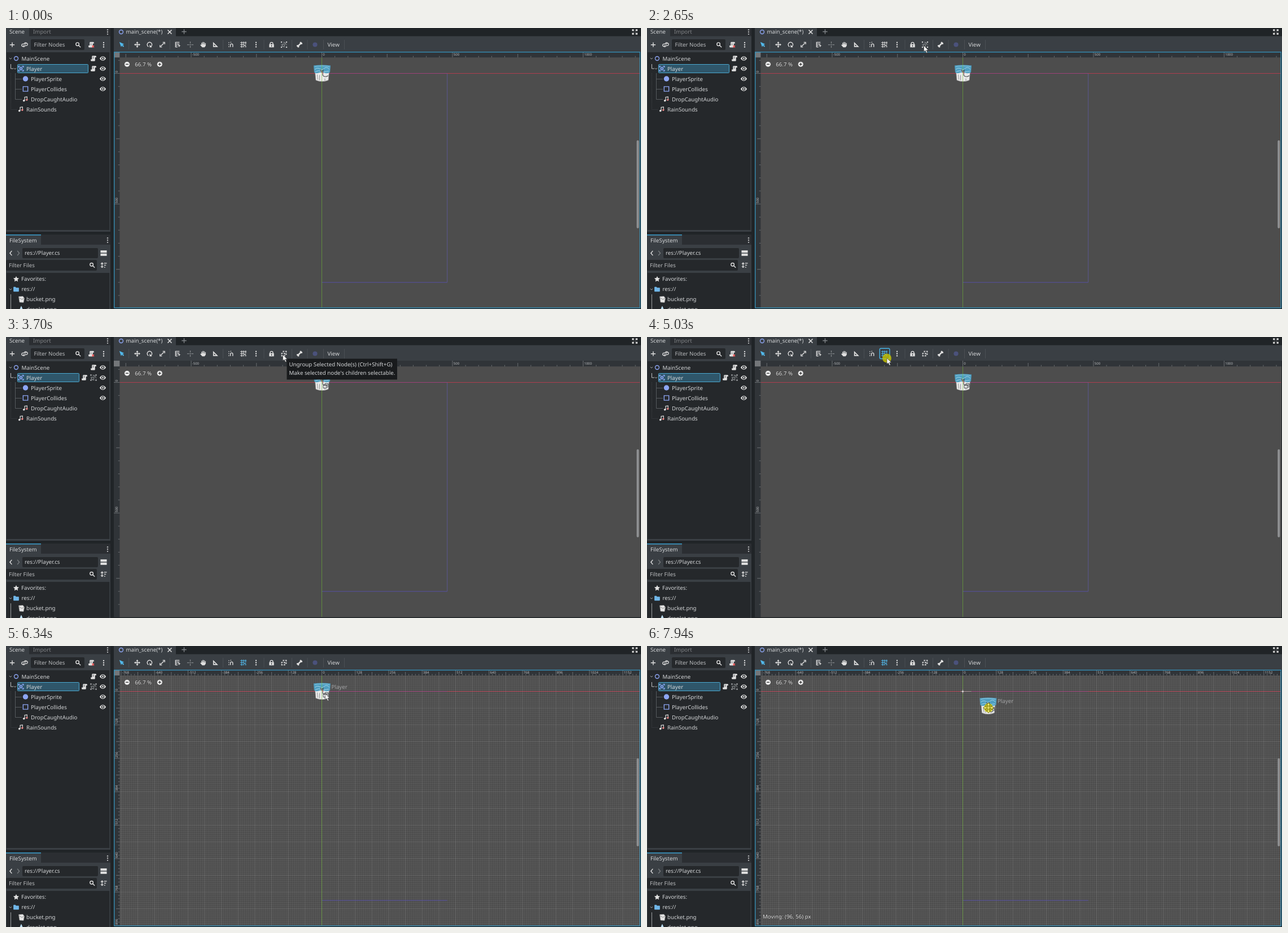
Recreate the animation shown at these times as an HTML page. Size 1125 px wide and 498 px high, loop 8 s.

```html
<!DOCTYPE html>
<html lang="en">
<head>
<meta charset="utf-8">
<title>Scene editor</title>
<style>
html, body { margin: 0; width: 100%; height: 100%; overflow: hidden; background: #25282b; }
svg { display: block; width: 1125px; height: 498px; }
text { font-family: "Noto Sans", "Open Sans", sans-serif; font-size: 9.72px; fill: #d3d5d7; white-space: pre; text-rendering: geometricPrecision; }
.small { font-size: 6px; opacity: .85; }
.outlined { fill: #e9e9e9; stroke: #333; stroke-width: 1px; paint-order: stroke; }
</style>
</head>
<body>
<svg id="stage" viewBox="0 0 1125 498"></svg>
<script>
const S = 1125 / 1620;          // interface scale
const K = S * 2 / 3;            // stage pixels per scene unit
const OX = 559.5, OY = 80.5;    // scene origin
const RX = 201.4, RY = 52.2;    // inner edges of the rulers
const BASE = '#3a3f44', DARK = '#25282b', GAP = '#202427', ICON = '#e0e0e0', BLUE = '#8da5f3';
const ACTIVE = '#52b8ea', MUTED = '#6c7074';

const rect = (x, y, w, h, fill, extra = '') => `<rect x="${x}" y="${y}" width="${w}" height="${h}" fill="${fill}" ${extra}/>`;
const path = (d, stroke, width = 1, fill = 'none', extra = '') =>
  `<path d="${d}" stroke="${stroke}" stroke-width="${width}" fill="${fill}" ${extra}/>`;
const text = (x, y, s, extra = '') => `<text x="${x}" y="${y}" ${extra}>${s}</text>`;
const group = (id, inner) => `<g id="${id}">${inner}</g>`;
const dot = (x, y, r, fill, extra = '') => `<circle cx="${x}" cy="${y}" r="${r}" fill="${fill}" ${extra}/>`;

// Icons are drawn on a 16-unit square.
const line = (d, c = ICON, w = 2) => path(d, c, w);
const solid = (d, c = ICON) => path(d, 'none', 0, c, 'fill-rule="evenodd"');
const squares = (c, spots) => spots.map(([x, y]) => rect(x, y, 3, 3, c)).join('');
const CROSS = 'M8 0l3 4H9v3h3V5l4 3-4 3V9H9v3h2l-3 4-3-4h2V9H4v2L0 8l4-3v2h3V4H5Z';
const icons = {
  plus: c => line('M8 2V14M2 8H14', c),
  link: c => line('M7 9 4 12M9 7 12 4M6 6H4a3 3 0 0 0-1 6l1 1h3l2-2V9M10 10h2a3 3 0 0 0 1-6l-1-1H9L7 5v2', c, 1.8),
  search: c => line('M10 6.5a4 4 0 1 1-8 0a4 4 0 1 1 8 0M9 9.5 14 14.5', c),
  dots: c => dot(8, 2.5, 1.7, c) + dot(8, 8, 1.7, c) + dot(8, 13.5, 1.7, c),
  script: c => solid('M6 1a2 2 0 0 0-2 2v7H1v3a2 2 0 0 0 2 2h7a2 2 0 0 0 2-2V5h3V3a2 2 0 0 0-2-2ZM6 4h3v1H6ZM6 7h3v1H6Z', c),
  detach: c => icons.script(c) + line('M10 10l5 5M15 10l-5 5', '#ff5f5f'),
  eye: c => solid('M0 8Q3 2.5 8 2.5T16 8Q13 13.5 8 13.5T0 8ZM8 4a4 4 0 1 0 0 8a4 4 0 1 0 0-8ZM8 6a2 2 0 1 1 0 4a2 2 0 1 1 0-4Z', c),
  ring: c => `<circle cx="8" cy="8" r="5" fill="none" stroke="${c}" stroke-width="2"/>`,
  arrow: c => line('M4 6l4 4 4-4', c, 1.8),
  body: c => line('M1.8 5V1.8H5M11 1.8h3.2V5M14.2 11v3.2H11M5 14.2H1.8V11', c) + rect(4, 4, 8, 8, c, 'rx="2"') +
    line('M5.5 5.5l5 5M10.5 5.5l-5 5', '#2f566a', 1.3),
  disc: c => dot(8, 8, 6.8, c),
  box: c => line('M2 2H14V14H2Z', c),
  audio: () => line('M6 12V3l6-1v6', ICON, 1.7) + dot(4, 12, 2.6, ICON) + dot(11, 10, 2, '#ff8f8f') +
    line('M12 7q3 2 0 5', '#ff8f8f', 1.3),
  select: c => solid('M2 1 6.5 14 8.5 10.5 12 14 14 12 10.5 8.5 14 6.5Z', c),
  move: c => solid(CROSS, c),
  rotate: c => line('M5 13.2A6 6 0 1 1 11 13', c) + solid('M8 8v7h6Z', c),
  scale: c => line('M4 12 12 4M9 2H14V7M2 9v5H7', c),
  list: c => line('M2 2H12M2 6H12M2 10H7M2 14H7M2 1V15', c, 1.8) + solid('M8 7l7 4-3 1-1 3Z', c),
  pivot: c => line('M8 0V5M8 11V16M0 8H5M11 8H16M6 8h4', c, 1.8),
  hand: c => solid('M4 8V3h2v4h1V1h2v6h1V2h2v6h1V4h2v7l-3 4H6L1 9l1-1Z', c),
  ruler: c => solid('M2 1 15 14H2ZM4.5 7V11.5H9Z', c),
  magnet: c => line('M6 14V9a3 3 0 0 1 6 0v5', c) + dot(2, 3, 1.2, c) + dot(7, 2, 1.2, c) + dot(2, 8, 1.2, c) + dot(2, 13, 1.2, c),
  grid: c => line('M4 0V16M9 0V9M14 0V8M0 3H16M0 8H10M0 13H7', c, 1.5) + line('M9 15v-3a2.5 2.5 0 0 1 5 0v3', c, 1.8),
  lock: c => solid('M8 1a4.5 4.5 0 0 0-4.5 4.5V7H2v8H14V7H12.5V5.5A4.5 4.5 0 0 0 8 1ZM8 3a2.5 2.5 0 0 1 2.5 2.5V7h-5V5.5A2.5 2.5 0 0 1 8 3ZM7 9h2v4H7Z', c),
  group: c => squares(c, [[0, 0], [13, 0], [0, 13], [13, 13]]) + line('M7 3.5h5V8M9 12.5H3.5V7H9Z', '#a4a7a9', 1.3) +
    line('M5 1.5h6M5 14.5h6M1.5 5v6M14.5 5v6', '#6d7175', 1.2),
  ungroup: c => line('M6 2H14V9H10M2 7H9V14H2Z', '#8e9194', 1.2) +
    squares(c, [[5, 1], [12, 1], [12, 8], [1, 6], [8, 6], [1, 12], [8, 12]]),
  bone: c => line('M4.5 11.5l7-7', c, 3.4) + dot(3, 11, 2.3, c) + dot(5, 13, 2.3, c) + dot(11, 3, 2.3, c) + dot(13, 5, 2.3, c),
  close: c => line('M3 3 13 13M13 3 3 13', c, 2.2),
  expand: c => line('M2 6V2H6M10 2h4V6M14 10v4H10M6 14H2V10M2 2l4 4M14 2l-4 4M14 14l-4-4M2 14l4-4', c, 1.9),
  back: c => line('M10 2 5 8l5 6', c),
  next: c => line('M6 2l5 6-5 6', c),
  split: c => rect(0, 1, 16, 6, c) + rect(0, 9, 16, 6, c),
  sort: c => line('M4 2V14M1 5 4 2l3 3M1 11l3 3 3-3M9 3h7M9 8h5M9 13h3', c, 1.8),
  star: c => solid('M8 1l2.2 4.7 5.1.7-3.7 3.6.9 5.1L8 12.6l-4.5 2.5.9-5.1L.7 6.4l5.1-.7Z', c),
  folder: c => solid('M1 3q0-1 1-1h4l2 2h6q1 0 1 1v8q0 1-1 1H2q-1 0-1-1Z', c),
};
const icon = (name, x, y, c = ICON, k = S) =>
  `<g transform="translate(${x} ${y}) scale(${k}) translate(-8 -8)">${icons[name](c)}</g>`;

function sceneDock() {
  const row = w => rect(20.5, 64.5, w, 15, '#2f566a', 'rx="1" stroke="#4ba9d0"');
  let s = rect(0, 0, 185, 361, BASE) + rect(41, 0, 144, 14.5, '#2b2e32') + rect(1, 43, 182.3, 315, DARK)
    + rect(44, 20, 95, 19, DARK, 'rx="2"')
    + text(6, 10.4, 'Scene') + text(48, 10.4, 'Import', 'opacity=".5"') + icon('dots', 180, 7, '#b5b7b9')
    + icon('plus', 11, 29.7) + icon('link', 33, 29.7) + text(49.5, 33.1, 'Filter Nodes', 'opacity=".85"')
    + icon('search', 128, 29.7) + icon('detach', 151, 29.7) + icon('dots', 173, 29.7);
  s += path('M16.5 80V126.5H28M16.5 90.5H28M16.5 108.5H28', MUTED, .7)
    + path('M8.5 80V144.5H20', '#4c5054', .7, 'none', 'stroke-dasharray="1 1"') + path('M8.5 64V72H13', '#bfc1c3', 1);
  s += group('rowWide', row(125) + icon('script', 155, 72))
    + group('rowGrouped', row(109) + icon('script', 139, 72) + icon('group', 155, 72, '#c6c8ca'));
  s += icon('arrow', 8, 54, '#a4a6a8', .55) + icon('arrow', 16, 72, '#a4a6a8', .55) + icon('script', 155, 54);
  [54, 72, 90, 108].forEach(y => { s += icon('eye', 171.5, y); });
  [['ring', 'MainScene', 18], ['body', 'Player', 26.5], ['disc', 'PlayerSprite', 34.5], ['box', 'PlayerCollides', 34.5],
    ['audio', 'DropCaughtAudio', 34.5], ['audio', 'RainSounds', 26.5]].forEach(([name, label, x], i) => {
    const y = 54 + 18 * i;
    s += icon(name, x, y, BLUE) + text(x + 9.4, y + 3.5, label);
  });
  return s;
}

function fileDock() {
  return rect(0, 384, 185, 114, BASE) + rect(0, 366, 185, 18, '#2b2e32') + rect(0, 366, 62, 18, BASE) + rect(0, 366, 62, 1.4, '#3ba6d8')
    + text(6, 379.7, 'FileSystem') + icon('dots', 180, 376, '#b5b7b9')
    + rect(29, 390, 134, 18, DARK, 'rx="2"') + rect(0, 411, 161, 19, DARK, 'rx="2"') + rect(1, 434, 182.3, 64, DARK)
    + icon('back', 9, 399) + icon('next', 21.5, 399, '#797d80') + text(33, 402.4, 'res://Player.cs') + icon('split', 173, 399)
    + text(5, 424, 'Filter Files', 'opacity=".85"') + icon('search', 153, 420.3) + icon('sort', 173, 420.3)
    + icon('star', 18, 444.5) + text(27, 448, 'Favorites:')
    + icon('arrow', 8, 463, '#a4a6a8', .55) + icon('folder', 18, 463, '#70b6e8') + text(27.5, 466.4, 'res://')
    + path('M8.5 472V498', '#bfc1c3', .8)
    + path('M22.5 476 30 475.5 32.5 479 31 486.5 24 486Z', '#999', .6, '#e6e6e6') + path('M23 478 28 481 32 479', '#777', .8)
    + text(36, 484.4, 'bucket.png')
    + path('M27 492.5Q30 498 30 501H24Q24 498 27 492.5', 'none', 0, '#b9dcf2') + text(36, 502.4, 'droplet.png');
}

function toolbar() {
  const focus = x => rect(x, 20.3, 17.6, 18.2, 'none', 'rx="2" stroke="#46b4e6" stroke-width="1.4"');
  let s = rect(191, 0, 934, 15, GAP) + rect(191, 0, 110, 15, BASE) + rect(191, 14.5, 934, 27.5, BASE)
    + icon('ring', 204, 7, BLUE) + text(212.5, 10.3, 'main_scene(*)') + icon('close', 290, 7) + icon('plus', 315.5, 6.5, '#808488')
    + icon('expand', 1114, 7);
  [217.5, 290.5, 384.5, 457, 506.5, 534, 562.5, 599.5].forEach(x => { s += path(`M${x} 21V38`, '#505459', .8); });
  const tools = { move: 232.5, rotate: 254.5, scale: 277, list: 304.5, hand: 349, ruler: 371, magnet: 399, dots: 443, lock: 470.5, bone: 520 };
  s += icon('select', 205, 29.5, ACTIVE) + icon('pivot', 326.5, 29.5, '#84888b') + icon('disc', 547.5, 29.5, '#4b527c', .6);
  for (const name in tools) s += icon(name, tools[name], 29.5);
  return s + group('gridOff', icon('grid', 420.5, 29.5)) + group('gridOn', icon('grid', 420.5, 29.5, ACTIVE))
    + group('groupBtn', icon('group', 492.5, 29.5, '#d0d2d4')) + group('ungroupBtn', icon('ungroup', 492.5, 29.5))
    + group('gridFocus', focus(412.3)) + group('groupFocus', focus(483.8))
    + text(569.5, 32.9, 'View');
}

// Ruler with a label every `unit`, halves and tenths between.
function rulers(unit) {
  const gap = unit * K / 10, W = 10.4;
  let ticks = '', labels = '';
  for (const upright of [false, true]) {
    const o = upright ? OY : OX, from = upright ? RY : RX, to = upright ? 496 : 1123;
    for (let n = Math.ceil((from - o) / gap); o + n * gap < to; n++) {
      const p = o + n * gap, full = n % 10 === 0;
      const len = full ? W : n % 5 === 0 ? W * .6 : W * .25;
      ticks += upright ? `M${RX - len} ${p}H${RX}` : `M${p} ${RY - len}V${RY}`;
      if (!full) continue;
      const label = n / 10 * unit;
      labels += upright ? text(0, 0, label, `class="small" transform="translate(198.2 ${p - 1.2}) rotate(-90)"`)
        : text(p + 1.8, 48.8, label, 'class="small"');
    }
  }
  return path(ticks, '#85888b', .7) + labels;
}

function gridLines() {
  const gap = 8 * K;
  let minor = '', major = '';
  const add = (n, d) => { if (n % 8) minor += d; else major += d; };
  for (let n = Math.ceil((RX - OX) / gap); OX + n * gap < 1123; n++) add(n, `M${OX + n * gap} ${RY}V496`);
  for (let n = Math.ceil((RY - OY) / gap); OY + n * gap < 496; n++) add(n, `M${RX} ${OY + n * gap}H1123`);
  return path(minor, 'rgba(255,255,255,.085)', S) + path(major, 'rgba(255,255,255,.2)', S);
}

function bucket() {
  return path('M-12.5 -4 -11 12Q0 16.5 11 12L12.5 -4Z', '#a5a5a5', .6, '#e9e9e9')
    + path('M-15 -14Q0 -16 15 -14L14 -2Q9 1 4 -1T-6 -1T-14 -2Z', 'none', 0, '#4f9fc2')
    + path('M-13 -12Q0 -15 13 -12', '#8cc6dd', 1.2)
    + path('M-13 -7Q-8 -11 -4 -8T4 -9T13 -7M-12 -3Q-6 -6 -2 -4T12 -4', '#a6d3e4', 1)
    + path('M-8.5 2 -7.5 11M-4.5 3V12M5 9V13', '#85888a', .9)
    + path('M-3 -7 -1 -2 2 -6 1 3Q4 8 11 4', '#484c50', 1.1)
    + path('M-2 -5 2 1', '#e05562', 1);
}

function viewport() {
  const mark = path('M2 4h6v6H2ZM5 4V2h6v6H8', '#505356', 1);
  const right = OX + 480 * K, bottom = OY + 800 * K;
  const zoomButton = (x, d) => dot(x, 64.3, 4.9, '#eee', 'stroke="#303030" stroke-width=".6"')
    + `<g transform="translate(${x} 64.3)">${path(d, '#333', 1.3)}</g>`;
  return rect(191, 42, 933, 455, '#4d4d4d')
    + group('grid', gridLines())
    + path(`M${OX} ${bottom}H${right}`, '#5650a4', 1)
    + group('sideEdge', path(`M${right} ${OY}V${bottom}`, '#5a5690', 1))
    + path(`M${RX} ${OY}H1123`, 'rgba(245,51,82,.58)', 1)
    + path(`M${OX} ${OY}H${right}`, 'rgba(130,70,180,.4)', 1)
    + group('player', bucket() + group('mark', mark) + group('name', text(16.5, -5, 'Player', 'opacity=".62"')))
    + path(`M${OX} ${RY}V496`, 'rgba(115,200,50,.52)', 1)
    + group('pivot', path(`M${OX - 4} ${OY}H${OX + 15}M${OX} ${OY - 4}V${OY + 4}`, '#b8a8a0', .8) + dot(OX, OY, 1.5, '#ddd'))
    + rect(1117.3, 199, 4, 156, '#8f9193', 'rx="2"')
    + rect(191, 42, 933, RY - 42, '#303438') + rect(191, 42, RX - 191, 455, '#303438')
    + group('rulerPlain', rulers(500)) + group('rulerGrid', rulers(128))
    + rect(191, 42, RX - 191, RY - 42, '#74777a')
    + zoomButton(214.5, 'M-2.5 0h5') + zoomButton(272.3, 'M-2.5 0h5M0 -2.5v5')
    + text(228.3, 67.7, '66.7 %', 'class="outlined"')
    + group('moving', text(205, 482.5, 'Moving: (96, 56) px', 'class="outlined"'))
    + rect(191, 496.6, 934, 2, GAP)
    + group('focus', rect(191.7, 42.7, 931.6, 453.2, 'none', 'stroke="#368db3" stroke-width="1.39"'));
}

const stage = document.getElementById('stage');
stage.innerHTML = rect(0, 0, 1125, 498, GAP) + viewport() + toolbar() + sceneDock() + fileDock()
  + group('tip', rect(497.5, 38.5, 195.5, 37, '#191b1d')
    + text(501.5, 51.8, 'Ungroup Selected Node(s) (Ctrl+Shift+G)') + text(501.5, 66.6, 'Make selected node\'s children selectable.'))
  + group('pointer', group('press', dot(0, 0, 8, '#c8c400', 'opacity=".8"'))
    + group('arrowTip', path('M0 0V10.6L2.5 8.3 4.5 12.8 6.3 12 4.4 7.7H7.8Z', '#333', .6, '#fff'))
    + group('moveTip', `<g transform="scale(1.15) translate(-8 -8)">${path(CROSS, '#5c5800', .7, '#f2ec6a')}</g>`));

// Pointer stops: time, x, y. Each holds until the next.
const stops = [
  [260, 844, 475], [530, 430, 270], [790, 53, 86], [1040, 70, 72], [1580, 401, 61], [1850, 483, 47],
  [2120, 488, 40], [2380, 491, 35], [2650, 490.5, 31.5], [4510, 466, 36], [4770, 425, 37.5],
  [5560, 448, 62], [5820, 512, 86], [6080, 557, 90], [6340, 565.5, 84.5],
  [6870, 564, 83], [7140, 561, 80.5], [7400, 558, 79], [7940, 605, 109.5],
];
const parts = {};
stage.querySelectorAll('[id]').forEach(e => { parts[e.id] = e; });
const show = (id, on) => parts[id].setAttribute('visibility', on ? 'visible' : 'hidden');
const place = (id, x, y) => parts[id].setAttribute('transform', `translate(${x} ${y})`);

function draw(t) {
  const during = (a, b) => t >= a && t < b;
  const grouped = t >= 3180, gridded = t >= 5290, toggled = t >= 5030, dragging = t >= 7940;
  show('rowWide', !grouped);
  show('rowGrouped', grouped);
  show('groupBtn', !grouped);
  show('ungroupBtn', grouped);
  show('groupFocus', during(2920, 3180));
  show('gridOff', !toggled);
  show('gridOn', toggled);
  show('gridFocus', during(5030, 5560));
  show('grid', gridded);
  show('sideEdge', !gridded);
  show('rulerPlain', !gridded);
  show('rulerGrid', gridded);
  show('focus', !during(2920, 5560));
  show('mark', grouped);
  show('name', t >= 6080);
  show('moving', dragging);
  show('pivot', dragging);
  show('tip', during(3700, 4510));
  place('player', OX + .5 + (dragging ? 96 * K : 0), OY + (dragging ? 56 * K : 0));

  const visible = t >= 260 && !during(4240, 4510);
  const stop = stops.filter(s => s[0] <= t).pop() || stops[0];
  place('pointer', stop[1], stop[2]);
  show('arrowTip', visible && !dragging);
  show('moveTip', dragging);
  show('press', during(2920, 3180) || during(5030, 5290) || t >= 7670);
}

function tick() {
  draw(performance.now() % 8000);
  requestAnimationFrame(tick);
}
tick();
</script>
</body>
</html>
```
